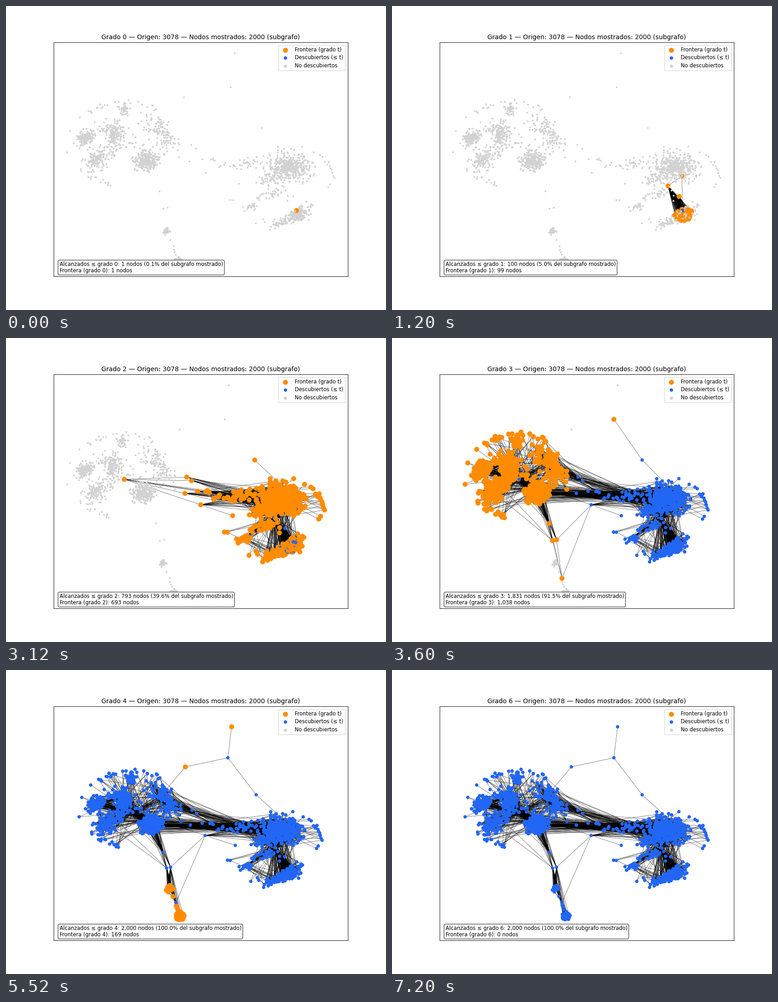
These frames come from a looping animation (837x669 px, 8.4 s). A matplotlib script:

```python
import numpy as np
import matplotlib.pyplot as plt
from matplotlib.animation import FuncAnimation
from matplotlib.collections import LineCollection

W, H, DPI = 837, 669, 83.7
ORANGE, BLUE, GREY = "#ff8c00", "#2266f5", "#d2d2d2"
REACHED = [1, 100, 793, 1831, 2000, 2000, 2000]
TOTAL = 2000

plt.rcParams["font.family"] = "DejaVu Sans"
rng = np.random.default_rng(3078)

# ---------------------------------------------------------------- nodes
pts, levels = [], []


def add(level, *points):
    """Store points and return their indices."""
    start = len(pts)
    pts.extend(points)
    levels.extend([level] * len(points))
    return np.arange(start, len(pts))


def blob(level, n, center, spread, tilt=0, cut=2.5):
    """Tilted cloud with a dense heart and a loose halo."""
    z = rng.normal(size=(9 * n, 2)) * rng.uniform(0.4, 1.5, (9 * n, 1))
    z = z[np.hypot(*z.T) < cut][:n] * spread
    c, s = np.cos(np.radians(tilt)), np.sin(np.radians(tilt))
    return add(level, *(z @ np.array([[c, s], [-s, c]]) + center))


def arc(level, n, center, radii, start, stop):
    a = np.radians(rng.uniform(start, stop, n))
    k = rng.uniform(0.9, 1, (n, 1))
    return add(level, *(center + k * np.c_[np.cos(a), np.sin(a)] * radii))


def trail(level, n, start, end, jitter=0):
    return add(level, *(np.linspace(start, end, n) + rng.normal(0, jitter, (n, 2))))


veiled = add(1, (638.5, 374))

# left community
west = blob(3, 170, (176, 290), (13, 8), -35)
south = blob(3, 145, (200, 335), (17, 12), -30)
north = blob(3, 135, (236, 284), (11, 15))
top = blob(3, 45, (260, 228), (7, 7))
core = blob(3, 300, (310, 341), (14, 11), -10)
ridge = blob(3, 120, (346, 283), (32, 12), 52)
fill = blob(3, 80, (252, 292), (58, 34), 15, 1.9)
rim = np.r_[arc(3, 24, (262, 303), (125, 97), -132, -55),
            arc(3, 16, (262, 303), (125, 97), 105, 145),
            add(3, (134.5, 322), (141, 275))]
left = np.r_[west, south, north, top, core, ridge, fill, rim]

# right community
main = blob(2, 350, (623, 354), (24, 16), 8)
lower = blob(2, 60, (590, 378), (18, 10), -15)
wide = blob(2, 70, (622, 345), (46, 24), 0, 1.8)
side = arc(2, 16, (640, 375), (84, 60), -65, 28)
neck = blob(2, 24, (532, 347), (13, 8))
middle = blob(2, 34, (588, 414), (22, 8))
pocket = blob(2, 20, (540, 440), (6, 4))
right = np.r_[main, lower, wide, side, neck]

near = blob(1, 96, (643, 459), (13, 9), -15, 1.6)
bottom = blob(2, 78, (648, 457), (15, 9), -30)
tail = blob(2, 62, (612, 474), (20, 6), -20, 2.1)
fringe = trail(2, 9, (495, 422), (582, 488), 5)
base = np.r_[bottom, tail]

outposts = add(2, (408, 306), (419, 314), (404, 342), (440, 367))
bridge = trail(2, 11, (436, 338), (500, 351), 4)
lone = add(2, (513, 391))[0]

# chains to the remote nodes
gates = add(3, (338, 408), (346.5, 446), (356, 444), (369.3, 529))
nest = np.r_[blob(4, 40, (354, 496), (5, 5), 0, 1.8), add(4, (362, 515))]
disk = np.r_[blob(4, 125, (378.7, 562), (7, 7), 0, 1.5),
             trail(4, 3, (370, 537), (374, 547))]
mast = add(2, (563.5, 268.5))[0]
joint = add(3, (495, 179))[0]
tips = add(4, (504, 104), (392, 201))

# hubs and a few late nodes lie above the clouds
body = len(pts)
left_hub = add(2, (265.3, 311))[0]
right_hub, low_hub = add(1, (632.5, 419), (608, 396))
origin = add(0, (640, 450))[0]
trail(2, 3, (611, 396), (620, 417), 1)
add(2, (637, 451.5))
blob(2, 8, (643, 459), (12, 8))

pts = np.array(pts)
levels = np.array(levels)
order = np.r_[veiled, rng.permutation(np.arange(1, body)), np.arange(body, len(pts))]

# ---------------------------------------------------------------- edges
edges = []


def star(hub, members):
    edges.extend((hub, m) for m in members)


def fan(hubs, members, k):
    """Join each hub to k random members."""
    for hub in hubs:
        star(hub, rng.choice(members, min(k, len(members)), replace=False))


for group in (west, south, north, top, core, ridge, main, lower, pocket,
              near, bottom, nest, disk):
    fan(group, group, 2)

# inside the left community
fan([left_hub], left, 330)
fan(core[:1], left, 90)
fan(north[:1], np.r_[west, top, rim], 50)
fan(np.r_[rim, fill], np.r_[north, ridge, core], 1)

# inside the right community
star(low_hub, np.r_[near, base[::2], right[::4], middle, pocket, fringe, veiled, origin])
star(right_hub, np.r_[near[::2], origin])
star(origin, np.r_[near, veiled])
fan(np.r_[wide, side, middle], main, 1)
fan(base[::2], np.r_[lower, middle, main], 1)
fan(np.r_[pocket, fringe], np.r_[middle, tail], 1)

# between both
star(left_hub, np.r_[outposts, bridge[:4]])
fan(outposts[:2], ridge, 22)
fan(outposts, np.r_[neck, lower, main], 9)
fan(np.r_[bridge, outposts[2:]], np.r_[neck, main], 7)
fan(np.r_[bridge, neck], np.r_[ridge, core], 4)
fan(neck, np.r_[main, lower], 5)
edges.append((lone, outposts[3]))

# remote nodes
fan(gates[:1], core, 40)
fan(gates[1:3], np.r_[core, south[:20]], 9)
for gate in gates[:3]:
    edges += [(gates[0], gate), (gates[3], gate)]
fan(gates[1:3], nest, 18)
fan(gates[1:3], disk, 7)
fan(gates[3:], np.r_[disk, nest], 40)
star(outposts[3], gates[2:])
star(joint, [mast, *tips])
edges += [(mast, main[0]), (tips[1], ridge[0])]

edges = np.array(edges)
edge_level = levels[edges].max(axis=1)


# ---------------------------------------------------------------- drawing
def place(t):
    """Node positions in pixels after the view has been rescaled for step t."""
    x, y = pts.T
    if t == 2:
        x = 134.5 + 0.9635 * (x - 134.5)
    elif t > 2:
        x = 161 + 0.909 * (x - 134.5)
    if t > 3:
        y = 125 + 0.909 * (y - 104)
    return np.c_[x, y]


fig, ax = plt.subplots(figsize=((W + 0.01) / DPI, (H + 0.01) / DPI), dpi=DPI)
for color, size, label in ((ORANGE, 90, "Frontera (grado t)"),
                           (BLUE, 42, "Descubiertos (≤ t)"),
                           (GREY, 38, "No descubiertos")):
    ax.scatter([], [], s=size, c=color, linewidths=0, label=label)
ax.legend(loc="upper right", labelspacing=0.36, borderpad=0.36)
ax.set(xticks=[], yticks=[], xlim=(0.125 * W, 0.9 * W), ylim=(0.89 * H, 0.12 * H))

lines = LineCollection([], colors="black", linewidths=0.42, zorder=1)
ax.add_collection(lines, autolim=False)
dots = ax.scatter(*pts[order].T, s=12, c=GREY, linewidths=0, zorder=2)
title = ax.set_title("")
note = ax.text(0.02, 0.0185, "", transform=ax.transAxes, fontsize=10, zorder=4,
               linespacing=1.07,
               bbox=dict(boxstyle="round,pad=0.26", fc="white", ec="#333333"))


def draw(t):
    pos = place(t)
    state = np.sign(levels[order] - t) + 1
    dots.set_offsets(pos[order])
    dots.set_facecolors(np.array([BLUE, ORANGE, GREY])[state])
    dots.set_sizes(np.array([42, 90, 12])[state])
    lines.set_segments(pos[edges[edge_level <= t]])

    reached = REACHED[t]
    front = reached - (REACHED[t - 1] if t else 0)
    title.set_text(f"Grado {t} — Origen: 3078 — Nodos mostrados: {TOTAL} (subgrafo)")
    note.set_text(f"Alcanzados ≤ grado {t}: {reached:,} nodos "
                  f"({100 * reached / TOTAL:.1f}% del subgrafo mostrado)\n"
                  f"Frontera (grado {t}): {front:,} nodos")
    return lines, dots, title, note


anim = FuncAnimation(fig, draw, frames=len(REACHED), interval=1200,
                     init_func=lambda: draw(0), repeat=True, repeat_delay=0)
plt.show()
```
